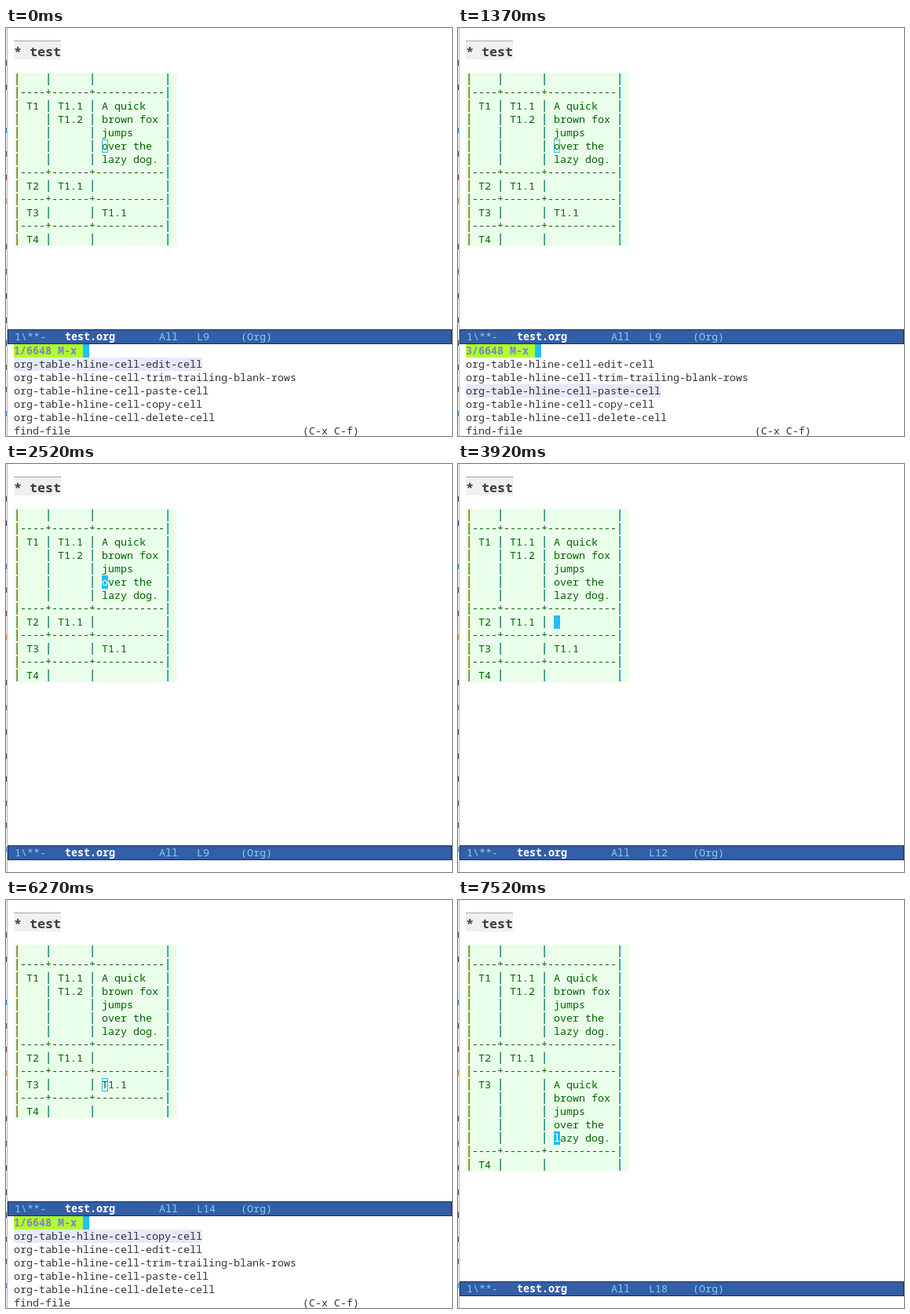
Write an HTML page that moves like this. It is 568x520 px and loops after 8 s.

```html
<!DOCTYPE html>
<html lang="en">
<head>
<meta charset="utf-8">
<title>Copy and paste a table cell</title>
<style>
html, body { margin: 0; width: 100%; height: 100%; overflow: hidden; background: #fff; }
body {
  position: relative;
  font: 13.3333px/17px "Noto Sans Mono", "DejaVu Sans Mono", monospace;
  font-variant-ligatures: none;
  color: #333;
}
div { position: absolute; white-space: pre; box-sizing: border-box; }
#edge { left: 1px; top: 0; width: 1px; height: 520px; background: #b4b4b4; }
.scrap { left: 0; width: 1px; height: 7px; }
#title {
  left: 10px; top: 16px; width: 60px; height: 24px;
  border-top: 1px solid #a7a7a7; background: #f0f0f0; color: #3c3c3c;
  font-size: 16.6667px; font-weight: 700; line-height: 25px;
}
#table { left: 10px; top: 57px; width: 208px; background: #eaffea; color: #006400; }
/* Column bars carry the colour fringe of subpixel text. */
#table b {
  display: inline-block; width: 8px; height: 17px; vertical-align: top; color: transparent;
  background: linear-gradient(90deg, #a3a540 50%, #12a0b4 50%) 3px 1px / 2px 15px no-repeat;
}
#table i { position: relative; top: -1px; font-style: normal; }
#bar {
  left: 2px; width: 566px; height: 19px; padding-left: 8px;
  border: 1px solid #1a2f54; background: #335ea8; color: #85ceeb;
}
#bar b { color: #fff; }
#prompt { left: 10px; height: 17px; background: #adff2f; color: #857fc4; font-weight: 700; }
#list { left: 10px; top: 420px; }
#list .picked { background: #e5eafa; }
.cursor { width: 8px; height: 17px; color: #fff; background: #21bdff; }
.cursor.hollow { background: none; border: 1px solid #21bdff; }
</style>
</head>
<body>
<div id="edge"></div>
<div id="title">* test</div>
<div id="table"></div>
<div id="point"></div>
<div id="bar"></div>
<div id="prompt"></div>
<div id="caret" class="cursor"></div>
<div id="list"></div>
<script>
const LOOP = 8000, CELL = 8, ROW = 17, LEFT = 10, TOP = 57, FIRST_LINE = 4, COL = 14;
const $ = id => document.getElementById(id);

const cmd = name => "org-table-hline-cell-" + name;
const [edit, trim, paste, copy, del] =
  ["edit-cell", "trim-trailing-blank-rows", "paste-cell", "copy-cell", "delete-cell"].map(cmd);
const rest = [del, "find-file".padEnd(46) + "(C-x C-f)", "eval-buffer"];
const before = [edit, trim, paste, copy, ...rest];
const after = [copy, edit, trim, paste, ...rest];

// Each step changes part of the state at its time.
const steps = [
  [0, { mini: "list", list: before, sel: 0, on: true, line: 9, pasted: false }],
  [530, { on: false }],
  [1060, { on: true }],
  [1120, { sel: 1 }],
  [1370, { sel: 2 }],
  [1770, { sel: 3 }],
  [2300, { on: false }],
  [2520, { mini: "", on: true }],
  [2980, { on: false }],
  [3510, { on: true, line: 10 }],
  [3730, { line: 11 }],
  [3920, { line: 12 }],
  [4110, { line: 13 }],
  [4390, { line: 14 }],
  [4920, { on: false }],
  [5050, { mini: "prompt", on: true }],
  [5270, { mini: "list", list: after, sel: 0 }],
  [5800, { on: false }],
  [6270, { on: true }],
  [6580, { sel: 1 }],
  [6740, { sel: 2 }],
  [6990, { sel: 3 }],
  [7460, { on: false }],
  [7520, { mini: "", on: true, line: 18, pasted: true }]
];

const row = (a = "", b = "", c = "") =>
  `| ${a.padEnd(2)} | ${b.padEnd(4)} | ${c.padEnd(9)} |`;
const rule = "|----+------+-----------|";
const words = ["A quick", "brown fox", "jumps", "over the", "lazy dog."];

function tableRows(pasted) {
  const third = pasted
    ? words.map((w, i) => row(i ? "" : "T3", "", w))
    : [row("T3", "", "T1.1")];
  return [
    row(), rule,
    ...words.map((w, i) => row(i ? "" : "T1", ["T1.1", "T1.2"][i], w)), rule,
    row("T2", "T1.1"), rule,
    ...third, rule,
    row("T4")
  ];
}

function drawBuffer(s) {
  const rows = tableRows(s.pasted), at = s.line - FIRST_LINE, point = $("point");
  $("table").innerHTML = rows.join("\n")
    .replace(/-[-+]+/g, "<i>$&</i>")
    .replaceAll("|", "<b>|</b>");
  point.className = s.mini ? "cursor hollow" : "cursor";
  point.textContent = s.mini ? "" : rows[at][COL];
  point.style.left = LEFT + COL * CELL + "px";
  point.style.top = TOP + at * ROW + "px";
  point.hidden = !s.mini && !s.on;
}

function drawMini(s) {
  const open = s.mini === "list", barTop = open ? 384 : 486;
  const text = (open ? `${s.sel + 1}/6648 ` : "") + "M-x ";
  $("bar").style.top = barTop + "px";
  $("bar").innerHTML = "1\\**-   <b>test.org</b>       All   "
    + ("L" + s.line).padEnd(7) + "(Org)";

  $("prompt").textContent = text;
  $("prompt").hidden = !s.mini;
  $("caret").hidden = !s.mini || !s.on;
  $("caret").style.left = LEFT + text.length * CELL + "px";
  $("prompt").style.top = $("caret").style.top = barTop + 19 + "px";

  const skip = Math.max(0, s.sel - 2);
  $("list").hidden = !open;
  $("list").innerHTML = s.list.slice(skip, skip + 6)
    .map((t, i) => `<div style="top:${i * ROW}px"${i + skip === s.sel ? ' class="picked"' : ""}>${t}</div>`)
    .join("");
}

// Slivers of the neighbouring window's text.
[[41, "#555"], [72, "#448"], [127, "#2a8be0"], [157, "#555"], [187, "#a04050"],
 [217, "#e09a50"], [275, "#555"], [307, "#777"], [338, "#555"], [369, "#555"],
 [398, "#444"], [429, "#666"], [457, "#766540"], [488, "#4a90d0"]].forEach(([y, color]) => {
  const scrap = document.createElement("div");
  scrap.className = "scrap";
  scrap.style.cssText = `top:${y}px;background:${color}`;
  document.body.append(scrap);
});

let shown = 0;
function tick() {
  const t = performance.now() % LOOP;
  const count = steps.filter(([at]) => at <= t).length;
  if (count !== shown) {
    const state = Object.assign({}, ...steps.slice(0, count).map(([, change]) => change));
    drawBuffer(state);
    drawMini(state);
    shown = count;
  }
  requestAnimationFrame(tick);
}
tick();
</script>
</body>
</html>
```
